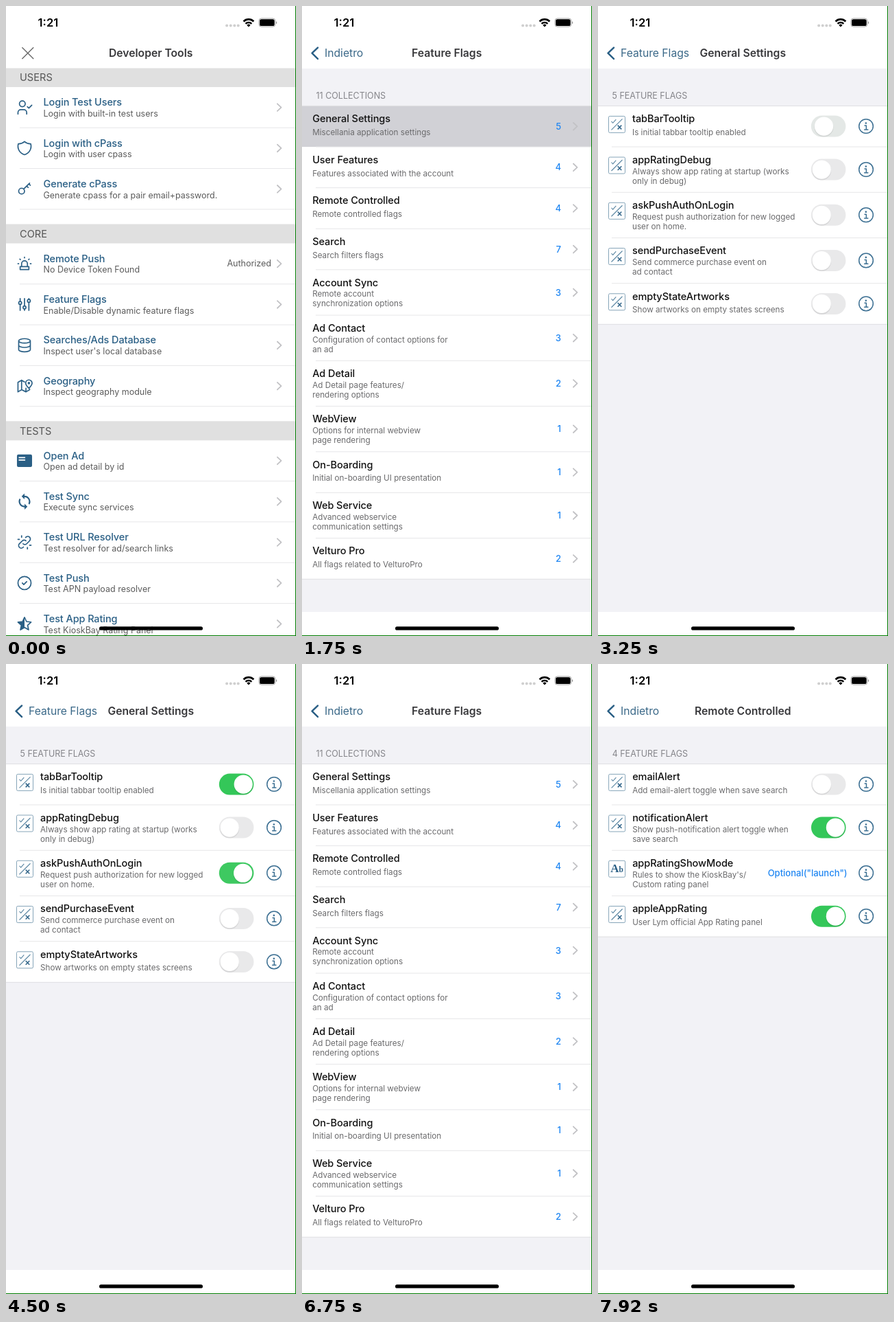
Write an HTML page that moves like this. It is 423 px wide and 917 px high and loops after 8 s.

```html
<!DOCTYPE html>
<html lang="en">
<head>
<meta charset="utf-8">
<title>Feature flags walkthrough</title>
<style>
html, body { margin: 0; width: 100%; height: 100%; overflow: hidden; background: #fff; }
svg { display: block; width: 423px; height: 917px; font-family: Inter, "Liberation Sans", sans-serif; }
.clock { font-size: 16.6px; font-weight: 600; }
.nav { font-size: 15.7px; font-weight: 600; fill: #38383b; text-anchor: middle; }
.back { font-size: 15.7px; fill: #3a6888; }
.band { font-size: 14.6px; fill: #555; }
.link { font-size: 14.5px; font-weight: 500; letter-spacing: -.1px; fill: #2a5f85; }
.note { font-size: 12.5px; fill: #5c5c5c; }
.caption { font-size: 12.5px; fill: #85858a; }
.name { font-size: 14.5px; font-weight: 500; letter-spacing: -.06px; fill: #111; }
.sub { font-size: 11.7px; fill: #6a6a6c; }
.count { font-size: 13px; font-weight: 500; fill: #1f86f2; text-anchor: end; }
.end { text-anchor: end; }
.line { fill: none; stroke: #2a5f85; stroke-width: 1.6; stroke-linecap: round; stroke-linejoin: round; }
.info .line { stroke: #3d7093; stroke-width: 1.5; }
.solid { fill: #2a5f85; }
.chev { fill: none; stroke: #c2c2c5; stroke-width: 1.8; stroke-linecap: round; stroke-linejoin: round; }
</style>
</head>
<body>
<svg id="stage" viewBox="0 0 423 917"></svg>
<script>
const W = 422, LOOP = 8000, FPS = 12;
const $ = id => document.getElementById(id);

const text = (cls, x, y, s) => `<text class="${cls}" x="${x}" y="${y}">${s}</text>`;
const rect = (x, y, w, h, fill, more = '') =>
  `<rect x="${x}" y="${y}" width="${w}" height="${h}" fill="${fill}" ${more}/>`;
const circle = (x, y, r, fill, more = '') =>
  `<circle cx="${x}" cy="${y}" r="${r}" fill="${fill}" ${more}/>`;
const line = d => `<path class="line" d="${d}"/>`;
const solid = d => `<path class="solid" d="${d}"/>`;
const ring = (x, y, r) => `<circle class="line" cx="${x}" cy="${y}" r="${r}"/>`;
const chevron = y => `<path class="chev" d="M395.8 ${y - 5.3}l5.6 5.3l-5.6 5.3"/>`;
const rule = (y, x = 20, color = '#e6e6e8') => rect(x, y - .5, W - x, 1, color);

// Icons on a 24 unit grid
const icons = {
  user: ring(9, 7, 4) + line('M3 21v-2a4 4 0 0 1 4-4h4a4 4 0 0 1 4 4v2M16 11l2 2l4-4'),
  shield: line('M12 3a12 12 0 0 0 8.5 3a12 12 0 0 1-8.5 15a12 12 0 0 1-8.5-15a12 12 0 0 0 8.5-3'),
  key: ring(8, 15, 4) + line('M10.85 12.15L19 4M18 5l2 2M15 8l2 2'),
  siren: line('M8 16v-4a4 4 0 0 1 8 0v4M3 12h1m8-9v1m8 8h1m-15.4-6.4l.7.7m12.1-.7l-.7.7M6 16h12v4h-12z'),
  sliders: ring(6, 10, 2) + ring(12, 16, 2) + ring(18, 7, 2) +
    line('M6 4v4M6 12v8M12 4v10M12 18v2M18 4v1M18 9v11'),
  data: line('M4 6a8 3 0 1 0 16 0a8 3 0 1 0-16 0v12a8 3 0 0 0 16 0v-12M4 12a8 3 0 0 0 16 0'),
  map: line('M12 6.5L8 4L3 7v13l5-3l6 3l5-3v-1M8 4v13M14 15v5') + ring(18, 8, .9) +
    line('M18 15c-2.5-2.5-4.4-4.5-4.4-7a4.4 4.4 0 0 1 8.8 0c0 2.5-1.9 4.5-4.4 7z'),
  card: rect(1.6, 3.4, 20.8, 17.2, '#2a5f85', 'rx="2"') +
    '<path stroke="#fff" stroke-width="1.7" d="M4 7.8h9M4 11h9"/>',
  sync: solid('M12 4V1L8 5l4 4V6a6 6 0 0 1 5.3 8.8l1.46 1.46A8 8 0 0 0 12 4zM12 18a6 6 0 0 1-5.3-8.8L5.24 7.74A8 8 0 0 0 12 20v3l4-4l-4-4z'),
  unlink: line('M10 14a3.5 3.5 0 0 0 5 0l4-4a3.5 3.5 0 0 0-5-5l-.5.5M14 10a3.5 3.5 0 0 0-5 0l-4 4a3.5 3.5 0 0 0 5 5l.5-.5M16 21v-2M19 16h2M3 8h2M8 3v2'),
  check: ring(12, 12, 9) + line('M9 12l2 2l4-4'),
  star: line('M12 3l2.7 5.9l6.3.7l-4.7 4.3l1.3 6.3l-5.6-3.2l-5.6 3.2l1.3-6.3L3 9.6l6.3-.7z') +
    solid('M12 3v14l-5.6 3.2l1.3-6.3L3 9.6l6.3-.7z')
};
const icon = (name, y) =>
  `<g transform="translate(27 ${y}) scale(1.06) translate(-12 -12)">${icons[name]}</g>`;

const tools = [
  [90, 'USERS', [
    ['user', 'Login Test Users', 'Login with built-in test users'],
    ['shield', 'Login with cPass', 'Login with user cpass'],
    ['key', 'Generate cPass', 'Generate cpass for a pair email+password.']]],
  [317.5, 'CORE', [
    ['siren', 'Remote Push', 'No Device Token Found', 'Authorized'],
    ['sliders', 'Feature Flags', 'Enable/Disable dynamic feature flags'],
    ['data', 'Searches/Ads Database', "Inspect user's local database"],
    ['map', 'Geography', 'Inspect geography module']]],
  [604.3, 'TESTS', [
    ['card', 'Open Ad', 'Open ad detail by id'],
    ['sync', 'Test Sync', 'Execute sync services'],
    ['unlink', 'Test URL Resolver', 'Test resolver for ad/search links'],
    ['check', 'Test Push', 'Test APN payload resolver'],
    ['star', 'Test App Rating', 'Test KioskBay Rating Panel']]]
];

const collections = [
  ['General Settings', 5, 'Miscellania application settings'],
  ['User Features', 4, 'Features associated with the account'],
  ['Remote Controlled', 4, 'Remote controlled flags'],
  ['Search', 7, 'Search filters flags'],
  ['Account Sync', 3, 'Remote account', 'synchronization options'],
  ['Ad Contact', 3, 'Configuration of contact options for', 'an ad'],
  ['Ad Detail', 2, 'Ad Detail page features/', 'rendering options'],
  ['WebView', 1, 'Options for internal webview', 'page rendering'],
  ['On-Boarding', 1, 'Initial on-boarding UI presentation'],
  ['Web Service', 1, 'Advanced webservice', 'communication settings'],
  ['Velturo Pro', 2, 'All flags related to VelturoPro']
];

// The second entry is a switch id, a fixed switch state or a text value
const generalFlags = [
  ['tabBarTooltip', 'tip', 'Is initial tabbar tooltip enabled'],
  ['appRatingDebug', 0, 'Always show app rating at startup (works', 'only in debug)'],
  ['askPushAuthOnLogin', 'ask', 'Request push authorization for new logged', 'user on home.'],
  ['sendPurchaseEvent', 0, 'Send commerce purchase event on', 'ad contact'],
  ['emptyStateArtworks', 0, 'Show artworks on empty states screens']
];
const remoteFlags = [
  ['emailAlert', 0, 'Add email-alert toggle when save search'],
  ['notificationAlert', 1, 'Show push-notification alert toggle when', 'save search'],
  ['appRatingShowMode', 'Optional("launch")', "Rules to show the KioskBay's/", 'Custom rating panel'],
  ['appleAppRating', 1, 'User Lym official App Rating panel']
];

function toolsPage() {
  let out = rect(0, 90, W, 827, '#fff');
  for (const [top, title, rows] of tools) {
    out += rect(0, top, W, 28, '#e0e0e0') + text('band', 20, top + 19.4, title);
    rows.forEach(([pic, name, note, value], i) => {
      const y = top + 28 + i * 59.35, mid = y + 29.6;
      if (name === 'Feature Flags') out += rect(0, y, W, 59.3, '#d9d9dc', 'id="hitTools" opacity="0"');
      out += icon(pic, mid) + text('link', 54.5, y + 27.2, name) + text('note', 54.5, y + 42.8, note) +
        (value ? text('note end', 387, mid + 4.3, value) : '') + chevron(mid) + rule(y + 59.2);
    });
  }
  return out;
}

// Grouped table: draw(row, top, height) supplies what stands beside the labels
function table(caption, rows, x, draw) {
  let y = 145.4, body = '';
  rows.forEach((row, i) => {
    const [name, , ...notes] = row, two = notes.length > 1, h = two ? 66.25 : 59.6;
    body += draw(row, y, h, i) + text('name', x, y + 23.8, name);
    notes.forEach((s, n) => body += text('sub', x, y + (two ? 39.6 + n * 13.9 : 42.6), s));
    y += h;
    if (i < rows.length - 1) body += rule(y);
  });
  return rect(0, 90, W, 827, '#fff') + rect(0, 91, W, 791, '#f2f2f6') +
    text('caption', 20.5, 135.4, caption) + rect(0, 145.4, W, y - 145.4, '#fff') +
    body + rule(145.4, 0, '#dfdfe2') + rule(y, 0, '#dfdfe2');
}

const collectionsPage = () => table('11 COLLECTIONS', collections, 15.2, (row, y, h, i) =>
  rect(0, y, W, h, '#d1d1d6', `id="hit${i}" opacity="0"`) +
  text('count', 378, y + h / 2 + 4.6, row[1]) + chevron(y + h / 2));

const toggle = (y, id, on) => `<g ${id ? `id="${id}"` : ''}>` +
  rect(310.8, y - 15.6, 50.6, 31, on ? '#34c759' : '#e9e9ea', 'rx="15.5"') +
  `<g transform="translate(${on ? 346.2 : 326.2} ${y - .1})">` +
  circle(0, 1.6, 13.9, '#000', 'opacity=".08"') + circle(0, 0, 13.6, '#fff') + '</g></g>';

const info = y => `<g class="info" transform="translate(391 ${y - .2})">` +
  '<circle class="line" r="10.3"/>' + circle(-.2, -4.5, 1.3, '#3d7093') +
  '<path class="line" d="M-2-1H.3V4.8M-2.4 4.9H2.8"/></g>';

function flagIcon(y, letters) {
  const box = rect(15.5, y - 12, 24, 24, '#fff', 'rx="1.8" stroke="#86a5b9"');
  if (letters) return box + `<text x="18" y="${y + 5.2}" font-family="Liberation Serif, serif" font-weight="700" ` +
    'font-size="17" fill="#2a5f85">A<tspan font-size="11.5">b</tspan></text>';
  return box + `<g transform="translate(27.5 ${y})" fill="none" stroke="#5a86a2">` +
    '<path d="M-8 8L8-8" stroke-width="1.1"/><path d="M-8-4.5l2.2 2.4l4.6-5.2" stroke-width="1.1"/>' +
    '<path d="M1.2 1.2l5.6 5.8M6.8 1.2l-5.6 5.8" stroke="#35688c" stroke-width="1.6"/></g>';
}

const flagsPage = (caption, rows) => table(caption, rows, 50, ([, value], y, h) => {
  const mid = y + h / 2, label = String(value).includes('(');
  return flagIcon(y + 27, label) + info(mid) + (label
    ? text('count', 363.5, mid + 4.6, value)
    : toggle(mid, typeof value === 'string' && value, value === 1));
});

// left: where the title starts, from: where the back label starts its move
const pages = [
  { id: 'tools', title: 'Developer Tools', left: 150, body: toolsPage() },
  { id: 'flags', title: 'Feature Flags', left: 160, back: 'Indietro', from: 150, body: collectionsPage() },
  { id: 'general', title: 'General Settings', left: 148, back: 'Feature Flags', from: 160,
    body: flagsPage('5 FEATURE FLAGS', generalFlags) },
  { id: 'remote', title: 'Remote Controlled', left: 140.5, back: 'Indietro', from: 160,
    body: flagsPage('4 FEATURE FLAGS', remoteFlags) }
];

const statusBar = text('clock', 46.6, 30.3, '1:21') +
  [322.1, 327.7, 333.3, 338.7].map(x => circle(x, 28.6, 2, '#cfcfcf')).join('') +
  '<g fill="none" stroke="#000" stroke-width="2.6"><path d="M346.5 22.5a10.4 10.4 0 0 1 14.8 0"/>' +
  '<path d="M349.5 25.8a6.2 6.2 0 0 1 8.8 0"/></g><path d="M353.9 30.6l-2.6-2.7a3.7 3.7 0 0 1 5.2 0z"/>' +
  rect(368.8, 18, 24, 12.2, 'none', 'rx="3.8" stroke="#a8a8a8"') + rect(370, 19.2, 21.6, 9.8, '#000', 'rx="2.6"') +
  '<path d="M394 22.2a2.4 2.4 0 0 1 0 4z" fill="#888"/>';

$('stage').innerHTML = rect(0, 0, 423, 917, '#fff') +
  pages.map(p => `<g id="${p.id}">${p.body}` +
    rect(0, 90, W, 827, '#000', `id="${p.id}Dim" opacity="0"`) + '</g>').join('') +
  rect(0, 0, 423, 90.5, '#fff') +
  pages.map(p => `<g id="${p.id}Title">${text('nav', 211.2, 74.3, p.title)}</g>` +
    (p.back ? `<g id="${p.id}Back">${text('back', 33, 74.3, p.back)}</g>` : '')).join('') +
  '<path id="close" d="M23.4 60.2l16.8 16.8M40.2 60.2l-16.8 16.8" stroke="#6a6a6a" stroke-width="1.4"/>' +
  '<path id="arrow" d="M23 60.6l-8.4 8.1l8.4 8.1" fill="none" stroke="#2a5f85" stroke-width="2.5" stroke-linecap="round" stroke-linejoin="round"/>' +
  statusBar + rect(136, 903.3, 151, 5.2, '#000', 'rx="2.6"') +
  rect(422, 0, 1, 917, '#007c00') + rect(0, 916, 423, 1, '#007c00');

// Critically damped spring: the share of the way still to go
function left(t, start, rate = 18.3) {
  if (t <= start) return 1;
  const x = (t - start) / 1000 * rate;
  return x > 12 ? 0 : (1 + x) * Math.exp(-x);
}

function place(id, dx, opacity) {
  $(id).setAttribute('transform', `translate(${dx.toFixed(2)} 0)`);
  $(id).setAttribute('opacity', opacity.toFixed(3));
}

// ahead: 1 = still off to the right; under: 1 = covered by the next page
function setPage(p, ahead, under, press = 1) {
  place(p.id, ahead * W - under * W * .3, 1);
  $(p.id).setAttribute('display', ahead === 1 || under === 1 ? 'none' : 'inline');
  $(p.id + 'Dim').setAttribute('opacity', under * .1);
  const seen = (1 - ahead) * (1 - under);
  place(p.id + 'Title', ahead * (W - p.left) - under * (p.left - 33), seen);
  if (p.back) place(p.id + 'Back', ahead * (p.from - 33) - under * 110, seen * press);
}

function setToggle(id, p) {
  const [track, knob] = $(id).children, k = p * p;
  const mix = (a, b) => Math.round(a + (b - a) * k);
  track.setAttribute('fill', `rgb(${mix(233, 52)},${mix(233, 199)},${mix(234, 89)})`);
  const y = /[ ,]([\d.]+)\)/.exec(knob.getAttribute('transform'))[1];
  knob.setAttribute('transform', `translate(${(326.2 + 20 * p).toFixed(2)} ${y})`);
}

function draw(ms) {
  const t = Math.floor((ms + 4) * FPS / 1000) * 1000 / FPS;
  const first = left(t, 101), second = left(t, 1770), pop = left(t, 6180), third = left(t, 7350);
  const pressed = t >= 6080 && t < 7000;
  const press = pressed ? .2 : 1;
  const [tool, flag, general, remote] = pages;

  setPage(tool, 0, 1 - first);
  setPage(flag, first, (1 - second) * pop + (1 - third));
  setPage(general, t < 6180 ? second : 1 - pop, 0, press);
  setPage(remote, third, 0);

  $('close').setAttribute('opacity', first);
  $('arrow').setAttribute('opacity', (1 - first) * (pressed ? 1 - .8 * pop : 1));
  $('hitTools').setAttribute('opacity', t >= 80 ? 1 : 0);
  $('hit0').setAttribute('opacity', t >= 1749 ? pop : 0);
  $('hit2').setAttribute('opacity', t >= 7330 ? 1 : 0);
  setToggle('tip', 1 - left(t, 3198, 14));
  setToggle('ask', 1 - left(t, 4115, 14));
}

const begin = performance.now();
function tick() {
  draw((performance.now() - begin) % LOOP);
  requestAnimationFrame(tick);
}
tick();
</script>
</body>
</html>
```
